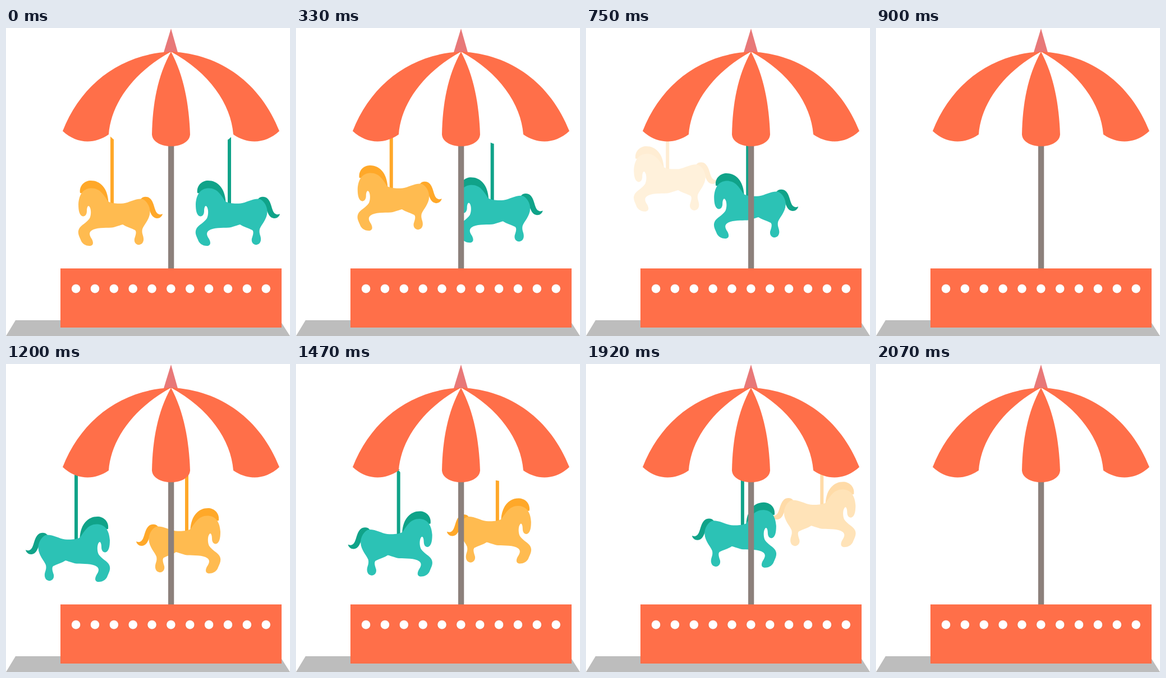
These frames come from a looping animation (506x547 px, 2100 ms). An HTML page:

```html
<!DOCTYPE html>
<html lang="en">
<head>
<meta charset="utf-8">
<title>Carousel</title>
<style>
  html, body { margin: 0; height: 100%; overflow: hidden; background: #fff; }
  svg { display: block; width: 100%; height: 100%; }
  .orange { fill: #ff6f49; }
  #yellow { color: #ffbb50; --dark: #ffa829; }
  #teal { color: #2cc2b5; --dark: #10a389; }
</style>
</head>
<body>
<svg viewBox="0 0 506 547">
  <defs>
    <clipPath id="below"><path d="M0 187H506V547H0Z"/></clipPath>
    <g id="horse">
      <g style="fill: var(--dark)">
        <path d="M186 90H192V316H186Z"/>
        <path d="M132 293C130 279 141 271 151 271C168 271 181 284 182.500 309L150 296Z"/>
        <path d="M240 304C243 299 252 298 257 303C265 311 264 326 271 330C274 332 277 331 279 330C278 336 271 340 265 337C256 333 256 318 251 315Z"/>
      </g>
      <path fill="currentColor" d="M129 313C130 295 138 285 151 284.500C168 284 174 297 182 308C188 312 200 312 209 311.500C220 310 229 303 242 303.500C251 306 257 318 256.500 327C256 340 246 349 243 357C241 366 246 369 245 377C244 383 240 385 236 385C230 384 228 379 229 374C231 368 233 362 230 359C222 355 214 353 208 349C200 351 194 354 188 354.500C176 355 160 354 152 360C147 364 149 369 153 375C156 381 156 386 150 387C140 387 135 382 133 376C130 369 127 364 130 357C133 350 144 346 149 338C152 332 152 321 148.500 317C146 314 144 319 144 325C144 331 141 335 137 334.500C131 333 129 325 129 313Z"/>
    </g>
    <g id="side">
      <path fill="#fff" d="M294 42L183 189C202 214 241 214 260 189Z"/>
      <path class="orange" d="M294 42C205 46 134 99 101 183C126 206 157 207 183 189C187 135 226 79 294 42Z"/>
    </g>
  </defs>

  <path fill="#bdbdbd" d="M17 519H488L506 547H0Z"/>
  <g clip-path="url(#below)">
    <use id="yellow" href="#horse"/>
    <use id="teal" href="#horse"/>
  </g>
  <path fill="#8c807b" d="M289 200H299.300V428H289Z"/>
  <path fill="#e87878" d="M294 1L306 43H281Z"/>
  <use href="#side"/>
  <use href="#side" transform="matrix(-1 0 0 1 588 0)"/>
  <path class="orange" d="M294 42C270 85 261 135 260 189C262 217 326 217 328 189C326 135 317 85 294 42Z"/>
  <path class="orange" d="M97 427H491V532H97Z"/>
  <g id="lamps" fill="#fff" stroke="#e9623e" stroke-width=".7"></g>
</svg>
<script>
  const LOOP = 2100, TURN = 1200, STEP = 30, FADE = 150;

  // Each ride: start x, y, speed x, y (px per ms), time when gone
  const rides = {
    yellow: [[0, 0, -0.0583, -0.0815, 780], [511, -15, 0.1365, -0.065, 1980]],
    teal: [[209, 0, -0.1464, -0.0173, 900], [314, 0, 0.2137, -0.035, 2070]]
  };

  const lamps = document.getElementById("lamps");
  for (let i = 0; i < 11; i++) {
    lamps.innerHTML += `<circle cx="${124.6 + 33.86 * i}" cy="463" r="8.2"/>`;
  }

  function draw(now) {
    const t = Math.floor((now % LOOP) / STEP) * STEP;
    const back = t >= TURN;
    const age = back ? t - TURN : t;
    for (const id in rides) {
      const [x, y, vx, vy, end] = rides[id][+back];
      const horse = document.getElementById(id);
      horse.setAttribute("transform",
        `translate(${x + vx * age} ${y + vy * age}) scale(${back ? -1 : 1} 1)`);
      horse.setAttribute("opacity", Math.max(0, Math.min(1, (end - t) / FADE)));
    }
  }

  let start;
  function tick(now) {
    start ??= now;
    draw(now - start);
    requestAnimationFrame(tick);
  }
  draw(0);
  requestAnimationFrame(tick);
</script>
</body>
</html>
```
